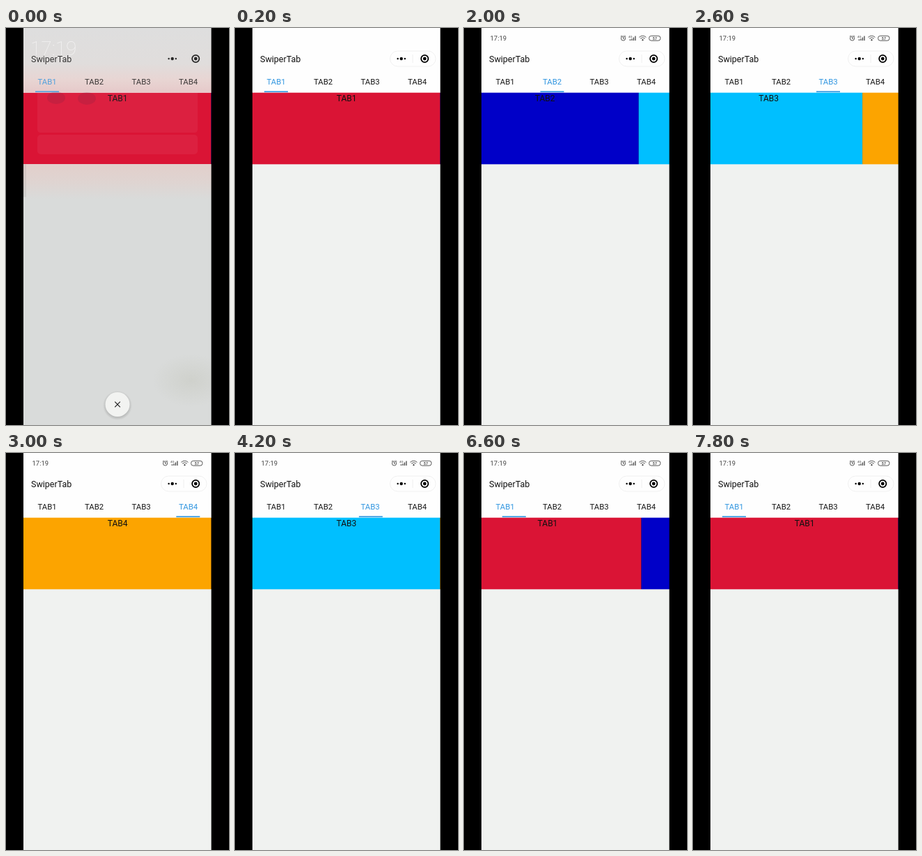
Animation of 320x569 px, one loop 8000 ms. Source, as an HTML page:

```html
<!DOCTYPE html>
<html lang="en">
<head>
<meta charset="utf-8">
<title>SwiperTab</title>
<style>
  html, body { margin: 0; width: 100%; height: 100%; overflow: hidden; background: #000; }
  svg { display: block; width: 100vw; height: 100vh; }
  text { font-family: Roboto, "Open Sans", sans-serif; }
  .mid { text-anchor: middle; }
</style>
</head>
<body>
<svg viewBox="0 0 320 569">
  <defs>
    <linearGradient id="headFog" x2="0" y2="1">
      <stop offset="0" stop-color="#dedede"/>
      <stop offset=".55" stop-color="#e0dddc"/>
      <stop offset=".8" stop-color="#e8d5d3"/>
      <stop offset="1" stop-color="#e6c9c9"/>
    </linearGradient>
    <linearGradient id="footFog" x2="0" y2="1">
      <stop offset="0" stop-color="#e2cfcb"/>
      <stop offset=".5" stop-color="#dfd4d1"/>
      <stop offset="1" stop-color="#d9dbda"/>
    </linearGradient>
    <radialGradient id="smudge">
      <stop offset="0" stop-color="#cfd1cc"/>
      <stop offset="1" stop-color="#cfd1cc" stop-opacity="0"/>
    </radialGradient>
    <radialGradient id="shadow">
      <stop offset=".8" stop-color="#000" stop-opacity=".14"/>
      <stop offset="1" stop-color="#000" stop-opacity="0"/>
    </radialGradient>
  </defs>

  <rect x="25" width="270" height="93" fill="#fefefe"/>
  <rect x="25" y="195" width="270" height="374" fill="#f0f2f0"/>
  <g id="pages"></g>

  <!-- Blurred system panel that is closing at the start -->
  <g id="veil">
    <rect x="25" width="270" height="92.5" fill="url(#headFog)"/>
    <rect x="25" y="195.3" width="270" height="374" fill="#d9dbda"/>
    <rect x="25" y="195.3" width="270" height="50" fill="url(#footFog)"/>
    <rect x="25" y="195.3" width="4" height="47" fill="#888" opacity=".15"/>
    <ellipse cx="266" cy="505" rx="56" ry="38" fill="url(#smudge)"/>
    <g fill="#fff" opacity=".05">
      <path d="M45 93h230v52q0 5-5 5H50q-5 0-5-5z"/>
      <rect x="45" y="153" width="230" height="28" rx="5"/>
    </g>
    <g fill="#602040" opacity=".16">
      <ellipse cx="72" cy="100" rx="13" ry="9"/>
      <ellipse cx="116" cy="101" rx="13" ry="9"/>
    </g>
    <text x="35" y="39" font-size="28" font-weight="100" fill="#fff" opacity=".65">17:19</text>
    <circle cx="160" cy="541" r="21" fill="url(#shadow)"/>
    <circle cx="160" cy="539.5" r="17.5" fill="#f2f3f1"/>
    <path d="M156.2 535.7l7.6 7.6m0-7.6l-7.6 7.6" stroke="#222" stroke-width="1.2"/>
  </g>

  <g id="chrome">
    <text x="36" y="48.6" font-size="12.5" fill="#111">SwiperTab</text>
    <g id="capsule" fill="none" stroke="#ededed" stroke-width=".8">
      <rect x="222.5" y="33" width="65.5" height="22" rx="11"/>
      <path d="M255 38v12"/>
    </g>
    <circle cx="233.6" cy="44" r="1.2"/>
    <circle cx="238.7" cy="44" r="2.2"/>
    <circle cx="243.8" cy="44" r="1.2"/>
    <circle cx="272.2" cy="44" r="5.1" fill="none" stroke="#000" stroke-width="1.8"/>
    <circle cx="272.2" cy="44" r="2.4"/>
    <g id="tabs"></g>
    <rect id="underline" y="90.4" width="34" height="1.7" fill="#3298e2"/>
  </g>

  <g id="status" fill="#444">
    <text x="37.6" y="18.2" font-size="9.4">17:19</text>
    <g fill="none" stroke="#444" stroke-width=".9">
      <circle cx="228.5" cy="14.9" r="3.1"/>
      <path d="M228.5 13v2.1h1.6M224.8 12.4l1.8-1.6M232.2 12.4l-1.8-1.6"/>
      <path d="M251.4 13.3q5-4.3 10 0M253.1 15.1q3.3-2.7 6.6 0"/>
      <rect x="265.6" y="11.3" width="16.2" height="6.8" rx="3"/>
      <path d="M238.4 18v-1.8M240.9 18v-2.8M243.4 18v-4.4M245.9 18v-6.4" stroke-width="1.3"/>
    </g>
    <circle cx="256.4" cy="17.1" r="1.2"/>
    <text x="236" y="14" font-size="4.4">4G</text>
    <text class="mid" x="273.7" y="16.8" font-size="5.8" font-weight="500">57</text>
  </g>

  <path d="M0 0h25v569H0zM294.6 0H320v569h-25.4z"/>
</svg>
<script>
const LOOP = 8000, STEP = 200;
const PAGE_WIDTH = 269.6, TAB_PITCH = 67.5;
const SWIPE_TIME = 550, RELEASE = 230, UNDERLINE_TIME = 400;
const BLUE = "#2f95e0";
const colors = ["#da1435", "#0000c8", "#00bfff", "#fca400"];
const swipes = [
  { start: 1230, to: 1 }, { start: 1843, to: 2 }, { start: 2430, to: 3 },
  { start: 3662, to: 2 }, { start: 4875, to: 1 }, { start: 6200, to: 0 }
];

const el = id => document.getElementById(id);
const clamp = v => Math.min(1, Math.max(0, v));
const easeInOut = u => u < .5 ? 2 * u * u : 1 - 2 * (1 - u) ** 2;
const easeOut = u => 1 - (1 - u) ** 3;

el("pages").innerHTML = colors.map((color, i) => {
  const x = 25 + i * PAGE_WIDTH;
  return `<rect x="${x}" y="92.7" width="${PAGE_WIDTH + .1}" height="102.6" fill="${color}"/>
    <text class="mid" x="${x + PAGE_WIDTH / 2 + .3}" y="104.8" font-size="12" fill="#111">TAB${i + 1}</text>`;
}).join("");
el("tabs").innerHTML = colors.map((_, i) =>
  `<text class="mid" x="${59 + i * TAB_PITCH}" y="80.8" font-size="11.3">TAB${i + 1}</text>`).join("");
const tabs = [...el("tabs").children];

// Follows the tab index through all swipes, each eased over its own span.
function follow(t, delay, duration, ease) {
  let from = 0, value = 0;
  for (const { start, to } of swipes) {
    value += (to - from) * ease(clamp((t - start - delay) / duration));
    from = to;
  }
  return value;
}

function draw(t) {
  const veiled = t < STEP;
  const position = follow(t, 0, SWIPE_TIME, easeInOut);
  const line = follow(t, RELEASE, UNDERLINE_TIME, easeOut);
  const active = follow(t, RELEASE, 1, Math.floor);

  el("pages").setAttribute("transform", `translate(${-position * PAGE_WIDTH} 0)`);
  el("underline").setAttribute("x", 42 + line * TAB_PITCH);
  tabs.forEach((tab, i) => tab.setAttribute("fill", i === active ? BLUE : "#151515"));
  el("veil").style.display = veiled ? "" : "none";
  el("capsule").style.display = veiled ? "none" : "";
  el("chrome").setAttribute("opacity", veiled ? .82 : 1);
  el("status").setAttribute("opacity", clamp((t - 200) / 400));
}

const origin = performance.now();
function tick() {
  const t = (performance.now() - origin) % LOOP;
  draw(Math.floor(t / STEP) * STEP);
  requestAnimationFrame(tick);
}
tick();
</script>
</body>
</html>
```
